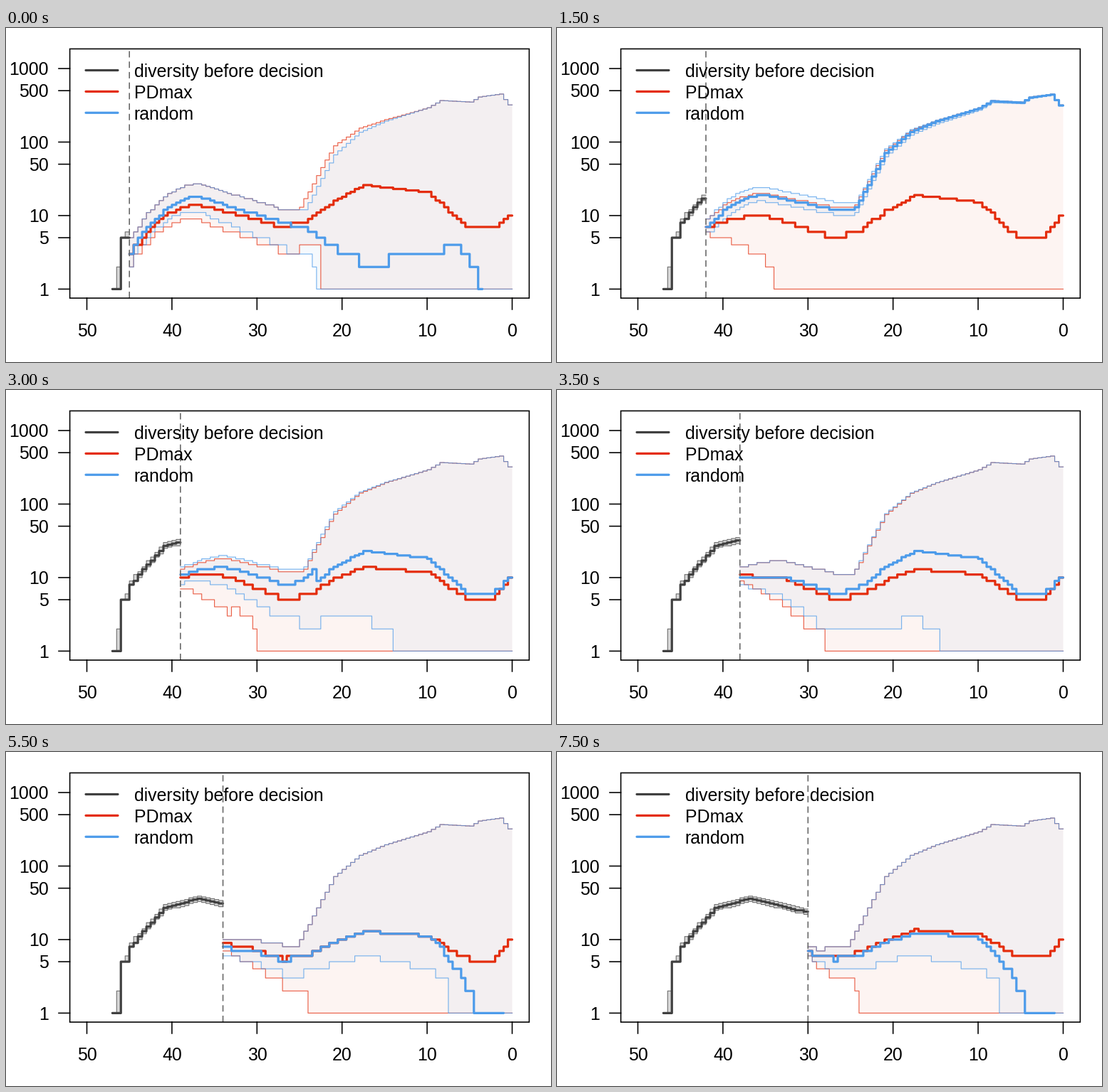
These frames come from a looping animation (765 by 470 pixels, 8 s). A matplotlib script:

```python
import numpy as np
import matplotlib.pyplot as plt
from matplotlib.animation import FuncAnimation
from matplotlib.patches import Polygon, Rectangle

plt.rcParams["path.snap"] = False
W, H, DPI = 765, 470, 100
PX = 72 / DPI
DARK, RED, BLUE = "#404040", "#e42c0c", "#4c9bea"
AGE = np.arange(47, -0.1, -0.5)


def X(age):
    return 710.5 - 11.94 * np.asarray(age)


def Y(count):
    return 367.4 - 103.45 * np.log10(count)


def keys(*points):
    """Linear interpolation through (age, value) points, oldest first."""
    ages, values = np.transpose(points)
    return np.interp(-AGE, -ages, values)


def log_keys(*points):
    return np.exp(keys(*[(a, np.log(v)) for a, v in points]))


past = log_keys((47, .9), (46.5, 1), (46, 4.6), (45.5, 5), (45, 8), (43, 15),
                (41, 27), (37, 36), (34, 30), (30, 23))
past = [np.round(.9 * past + .4), np.round(past), np.ceil(1.08 * past)]
past[0] = np.maximum(1, past[0])

# Shapes all runs share: boom of survivors, late bump, final recovery
BOOM = log_keys((25, 10), (23, 27), (21, 72), (18, 140), (15, 195), (10, 293),
                (8.5, 367), (5, 350), (4, 410), (1.5, 450), (.5, 320))
BOOM[AGE > 25] = 1
BUMP = keys((27, 0), (24, .17), (21, .63), (17.5, 1), (10, .83), (6, .1), (5, 0))
RECOVERY = keys((2.3, 0), (.4, 1))
DECLINE = np.exp(-(np.clip(12 - AGE, 0, None) / 6.6) ** 3)


def hump(d, start, top, low):
    """Ease from start to top after the decision, then settle at low."""
    mid = 27 + .56 * (d - 27)
    up = np.clip((d - AGE) / (d - mid), 0, 1)
    down = np.clip((mid - AGE) / (mid - 27), 0, 1)
    return start * (top / start) ** (1 - (1 - up) ** 2) * (low / top) ** down


def grow(d, head, peak):
    """Hump, then a bump to peak; without a peak it joins the boom."""
    early = hump(d, *head)
    if peak is None:
        return np.maximum(early, .98 * BOOM)
    low = head[-1]
    return early * (peak / low) ** BUMP * (10 / low) ** RECOVERY


def lineage(d, head, peak, cap, loss, lift=1, gone=None, core=None):
    """Low, median and high curves; loss is (age, share) of the low curve."""
    mid = grow(d, head, peak)
    if gone:
        mid = head[-1] * DECLINE * (10 / head[-1]) ** 0 * mid / (
            head[-1] * (10 / head[-1]) ** RECOVERY)
    end, share = loss
    low = grow(d, head, core or peak) * log_keys((d, .8), (end, share))
    low[AGE <= end] = 1
    boom = BOOM * (1 + (lift - 1) * np.clip((AGE - 8) / 14, 0, 1) ** 3)
    high = np.maximum(hump(d, *cap), boom)
    if peak is None:
        high = np.maximum(high, 1.28 * hump(d, *head))
    mid = np.maximum(1, mid)
    if gone:
        mid[AGE <= gone] = .4
    return np.maximum(1, low), mid, high


runs = {}


def run(d, cap, pdmax, rand):
    runs[d] = np.log([lineage(d, cap=cap, **pdmax), lineage(d, cap=cap, **rand)])


run(45, (5, 27, 12),
    dict(head=(3, 14, 7), peak=26, loss=(22.5, .4), lift=1.3),
    dict(head=(3, 18, 8), peak=2.3, loss=(23, .4), lift=.92, gone=3.5))
run(42, (9, 20, 13),
    dict(head=(7, 10, 5), peak=19, loss=(34, .2), lift=1.08),
    dict(head=(7, 19, 12), peak=None, loss=(-1, 1), lift=1.15))
run(40, (11, 19, 12.5),
    dict(head=(9, 11, 5), peak=15, loss=(33, .2), lift=1.05),
    dict(head=(9, 18, 11), peak=None, loss=(8, .12), lift=1.2, core=13))
run(38, (13.5, 17, 11.5),
    dict(head=(11, 10, 5), peak=13, loss=(28, .25)),
    dict(head=(10, 10.5, 6), peak=23, loss=(14.5, .09), lift=1.04))
run(36, (13, 16, 11.5),
    dict(head=(11, 8, 5), peak=13, loss=(25.5, .3)),
    dict(head=(11, 8.4, 6), peak=21, loss=(14.5, .1), lift=1.03))
run(34, (10, 10, 8.4),
    dict(head=(9, 7.5, 5.4), peak=13, loss=(24, .35)),
    dict(head=(8, 7, 5.3), peak=13, loss=(7.5, .33), gone=1))
run(30, (8, 7.4, 8),
    dict(head=(7, 6.2, 5.8), peak=13.5, loss=(24, .35)),
    dict(head=(7, 6.2, 5.4), peak=12.4, loss=(7.5, .33), gone=1))


def forecast(age):
    """Blend neighbouring runs; where they differ widely take the nearer."""
    a = min(k for k in runs if k >= age)
    b = max(k for k in runs if k <= age)
    w = (a - age) / (a - b) if a != b else 0
    gap = runs[b] - runs[a]
    w = np.where(abs(gap) > 1, float(w >= .5), w)
    count = np.exp(runs[a] + w * gap)
    return np.where(count < .7, np.nan, np.maximum(1, np.round(count)))


def stairs(ages, values):
    return np.repeat(X(ages), 2)[1:], np.repeat(Y(values), 2)[:-1]


fig = plt.figure(figsize=(W / DPI, H / DPI), dpi=DPI, facecolor="white")
ax = fig.add_axes([0, 0, 1, 1])
ax.set(xlim=(0, W), ylim=(H, 0))
ax.axis("off")


def line(x, y, color="black", px=1.6, **kw):
    return ax.plot(x, y, color=color, lw=px * PX, **kw)[0]


def label(x, y, text, ha):
    ax.text(x, y, text, ha=ha, va="baseline", family="Liberation Sans",
            size=24.9 * PX, zorder=6)


class Band:
    """Shaded range with thin edges and a bold median."""

    def __init__(self, color, alpha, edge):
        self.fill = ax.add_patch(Polygon([(0, 0)], fc=color, ec="none",
                                         alpha=alpha, zorder=1))
        self.lo = line([], [], color, 1.15, alpha=edge, zorder=2)
        self.hi = line([], [], color, 1.15, alpha=edge, zorder=2)
        self.mid = line([], [], color, 3.2, zorder=3, solid_capstyle="round")

    def set(self, ages, low, median, high):
        x, y0 = stairs(ages, low)
        y1 = stairs(ages, high)[1]
        self.lo.set_data(x, y0)
        self.hi.set_data(x, y1)
        self.mid.set_data(*stairs(ages, median))
        self.fill.set_xy(np.column_stack([np.r_[x, x[::-1]],
                                          np.r_[y0, y1[::-1]]]))


ax.add_patch(Rectangle((89.6, 29.4), 644.8, 350.7, fill=False, ec="black",
                       lw=1.6 * PX, zorder=5))
for n in (1, 5, 10, 50, 100, 500, 1000):
    line([74, 89.6], [Y(n), Y(n)])
    label(59.7, Y(n) + 9.2, str(n), "right")
for n in range(0, 51, 10):
    line([X(n), X(n)], [380, 396])
    label(X(n) + .4, 434.5, str(n), "center")
for i, (name, color) in enumerate([("diversity before decision", DARK),
                                   ("PDmax", RED), ("random", BLUE)]):
    y = 59.5 + 29.9 * i
    line([112, 157], [y, y], color, 3.2, zorder=6, solid_capstyle="round")
    label(179.6, y + 9.8, name, "left")

grey = Band(DARK, .2, .7)
pdmax = Band(RED, .052, .75)
rand = Band(BLUE, .056, .75)
now = line([], [], "#666666", 1.6, zorder=4, dashes=(5.6, 3.6),
           dash_capstyle="butt")


def draw(i):
    age = 45 - i
    old, new = AGE >= age, AGE <= age
    before = [c[old] for c in past]
    for c in before:
        c[-1] = c[-2]
    grey.set(AGE[old], *before)
    for band, curves in zip((pdmax, rand), forecast(age)):
        band.set(AGE[new], *curves[:, new])
    now.set_data([X(age)] * 2, [380, 29.5])
    return []


anim = FuncAnimation(fig, draw, frames=16, interval=500, repeat=True,
                     repeat_delay=0, init_func=lambda: draw(0))
plt.show()
```
